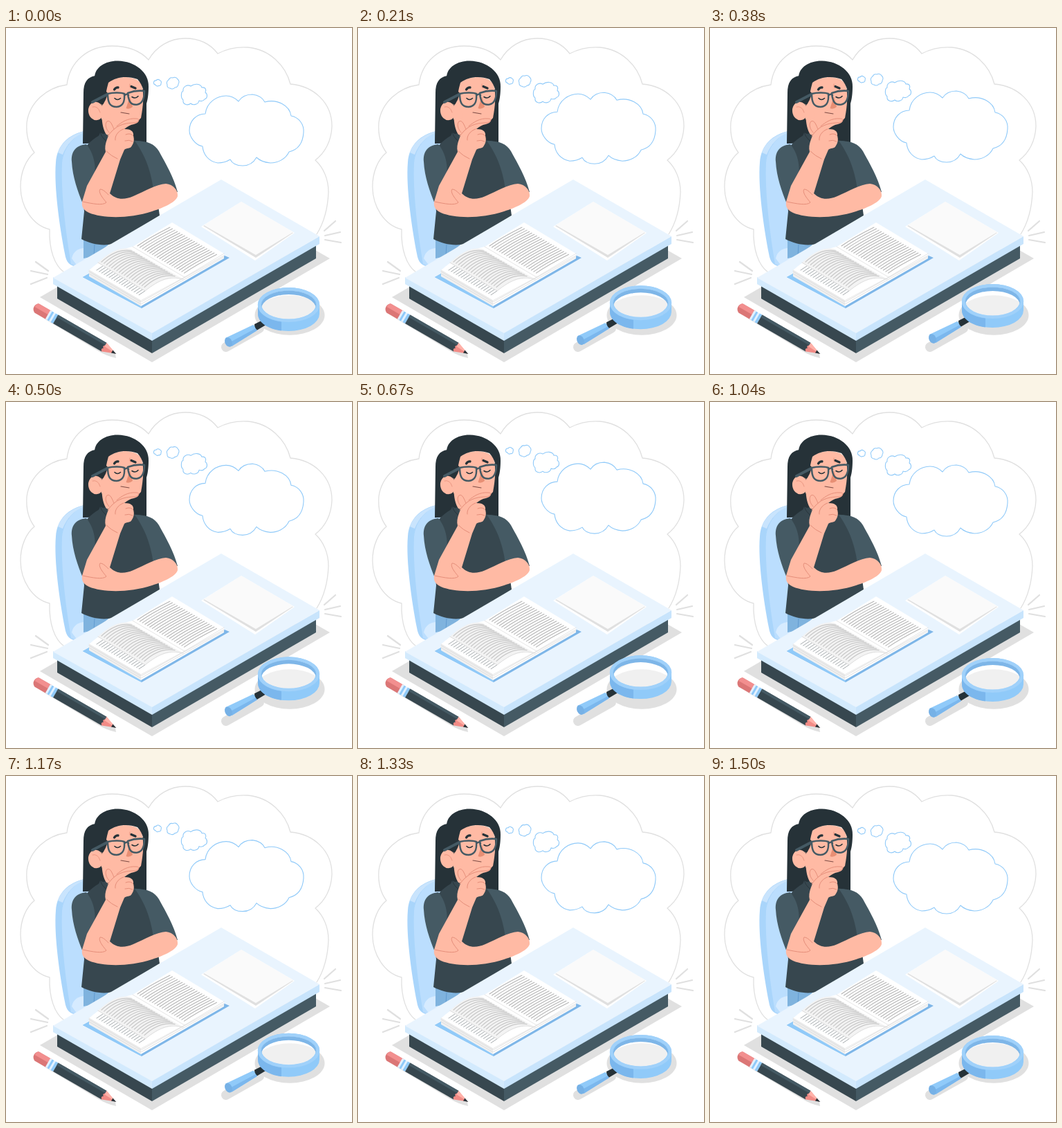
These frames come from a looping animation (500 by 500 pixels, 1.54 s). An HTML page with a canvas:

```html
<!DOCTYPE html>
<html lang="en">
<head>
<meta charset="utf-8">
<title>Thinking at a desk</title>
<style>
html, body { margin: 0; width: 100%; height: 100%; overflow: hidden; background: #fff; }
canvas { display: block; width: 500px; height: 500px; }
</style>
</head>
<body>
<canvas id="stage" width="500" height="500"></canvas>
<script>
const ctx = document.getElementById('stage').getContext('2d');
const LOOP = 1540, STEP = 1000 / 24, FLOAT = 1500, RISE = 10;
const INK = '#263238', DARK = '#37474f', SLATE = '#455a64', SKIN = '#ffbaa4',
      BLUE = '#90caf9', GREY = '#e0e0e0', CREASE = '#e58e7a';

function fill(color, d) {
  ctx.fillStyle = color;
  ctx.fill(new Path2D(d));
}

function line(color, width, d) {
  ctx.strokeStyle = color;
  ctx.lineWidth = width;
  ctx.stroke(new Path2D(d));
}

function oval(color, x, y, rx, ry, angle = 0) {
  ctx.fillStyle = color;
  ctx.beginPath();
  ctx.ellipse(x, y, rx, ry, angle, 0, Math.PI * 2);
  ctx.fill();
}

// Repeats one stroke along a page, stepping by (dx, dy).
function rows(count, dx, dy, color, width, d) {
  ctx.save();
  for (let i = 0; i < count; i++) {
    line(color, width, d);
    ctx.translate(dx, dy);
  }
  ctx.restore();
}

function drawBackdrop() {
  line(GREY, 1.3, 'M84 353C70 343 62 320 63 291C38 285 21 258 21 229C21 208 29 190 41 180C32 168 29 152 30 137C34 107 59 86 88 82C92 48 119 26 153 26C176 26 194 33 206 46C217 27 236 15 259 15C281 15 296 24 306 37C319 30 335 27 350 28C381 31 404 54 411 81C445 84 471 108 471 142C470 163 461 180 447 191C459 202 466 219 466 237C465 262 459 282 449 298');
  line(GREY, 2.2, 'M43 338L61 351M36 351L60 356M36 370L59 361M460 293L476 279M461 300L483 295M461 306L484 310');
  fill(GREY, 'M49 389L211 483L468 333L440 317L80 371Z');
  fill(GREY, 'M50 417L132 466Q145 474 159 477L158 471L145 466Z');
}

function drawChair() {
  fill('#a9d5fb', 'M113 149C91 154 74 168 72 194C69 230 78 290 85 326C87 339 92 344 104 345L126 331L125 170Z');
  fill('#bbdefe', 'M113 150C96 158 83 174 81 195C79 240 87 300 94 341L104 345L128 331L126 170Z');
  fill('#c9e4fd', 'M113 149C93 155 80 165 75 180L82 183C88 168 98 157 113 151Z');
  fill('#d6ebff', 'M95 333C97 322 106 317 116 318L126 332L104 345Z');
}

function drawBody() {
  fill(INK, 'M129 69C117 71 112 79 112 94L111 167L203 165L203 90Z');
  fill('#7fb3de', 'M112 306L150 312L126 330L112 333Z');
  line('#5a95cc', .8, 'M128 313L127 329');
  fill(DARK, 'M135 155C121 164 102 177 108 210L113 265L109 305C124 313 143 316 157 311L222 271L214 215L218 176C207 165 194 163 181 162L150 150Z');
  fill(SLATE, 'M116 168C100 170 94 179 95 193C96 215 104 237 111 254L124 227C132 211 130 184 116 168Z');
  fill(SLATE, 'M186 163C205 163 215 168 221 178C232 198 242 215 248 237L214 242C212 220 206 190 186 163Z');
}

function drawHead() {
  fill(SKIN, 'M138 125C139 137 140 148 146 155C156 159 166 153 169 143L174 131Z');
  fill(DARK, 'M136 151C145 156 156 156 167 151L169 165C151 170 139 167 132 162Z');
  line(INK, .8, 'M136 151Q140 163 151 166');
  fill(SKIN, 'M144 82C154 69 188 66 196 82C200 96 198 114 195 130C188 139 167 145 153 141C143 136 141 127 140 113Z');
  fill(INK, 'M128 72C128 56 145 47 162 47.5C186 48 207 64 206 85C206 94 205 105 202 112C201 95 198 83 190 74C176 69 160 70 148 79C145 89 144 98 142 106L138 116L128 106Z');
  oval(SKIN, 130, 120, 11, 13.2, -.15);
  fill(SKIN, 'M137 111L148 107L151 131L138 132Z');
  fill(INK, 'M144 91L138 113Q145 105 147 94Z');
  line(CREASE, .8, 'M125 114Q133 112 136 122');
  line(INK, 3.3, 'M156.5 89Q159 85.5 162 86M181 84.5L187 87');
  fill('#e88f74', 'M179 99L173.5 116Q178 118 183 114Z');
  line(INK, 1.6, 'M157 101.5Q161 105.5 165.5 101.5M182 99.5Q187 103 191 98.5');
  line(CREASE, .9, 'M179 81Q178 85 180 87');
  line(SLATE, 2.5, 'M147 95C155 93 166 93 171 95C172 107 169 113 160 114C150 114 147 108 147 95ZM176 94C184 91 192 90 200 91C200 102 197 109 190 110.5C180 112 177 106 176 94ZM171 98Q174 94 177 97');
  line(SLATE, 4, 'M146 96L125 107');
  line('#7d4c46', 1.1, 'M166 122L178 124');
}

function drawArms() {
  fill(SKIN, 'M110 251L117 228L144 179C141 167 149 157 149 151C145 147 142 139 146 135C151 132 154 142 156 146C164 136 176 130 188 131C194 132 193 137 185 139C179 140 175 143 171 146C180 146 185 149 184 156C186 162 184 167 182 170C180 175 174 173 171 176L165 190L150 239C159 248 170 249 184 243C200 236 217 226 231 225C242 226 249 235 248 243C246 251 230 259 211 265C177 276 139 275 120 267C112 263 109 259 110 251Z');
  line(CREASE, 1, 'M149 151C145 147 142 139 146 135C151 132 154 142 156 146M147 156L153 149C163 139 174 137 187 137C194 134 193 131 188 131C176 130 167 136 160 142M170 146C161 149 157 157 158 162M173 154Q180 151 184 156M172 163Q178 161 183 164M145 178Q152 185 161 189');
  line(CREASE, 1, 'M148 241C144 237 140 233 136 233C133 237 139 245 145 252C140 257 125 254 111 251');
}

function drawDesk() {
  fill(DARK, 'M74 372V391L211 470V450Z');
  fill(SLATE, 'M211 450V470L448 333V312Z');
  fill('#d3eafd', 'M68 360V370L211 452V440Z');
  fill('#c8e4fc', 'M211 440V452L453 312V301Z');
  fill('#e9f4fe', 'M68 361L311 219L453 301L211 441Z');
}

function drawPapers() {
  fill('#fff', 'M282 287L340 251L417 296L360 336Z');
  fill(GREY, 'M285 286L340 254L415 296L361 332Z');
  fill('#fafafa', 'M286 285L340 251L415 295L361 328Z');
}

function drawBook() {
  fill('#7eb6e8', 'M111 360L120 355L195 399L316 329L323 332L196 405Z');
  fill(BLUE, 'M111 360L120 355L195 400L196 405Z');
  fill('#f0f0f0', 'M120 349V359L195 402V393Z');
  fill('#fff', 'M195 393V402L315 333V326Z');
  line('#d5d5d5', .7, 'M120 352L195 396L315 329M120 355L195 399L315 331');
  fill('#fff', 'M120 350Q151 323 183 316L240 281L315 326L258 360L195 394Z');
  line(GREY, .8, 'M183 316L258 360L315 326M120 350L195 394L258 360');
  rows(20, 3.55, 2.06, '#b5b5b5', 1.1, 'M190 315Q207 303 237 288');
  rows(18, 3.6, 2.1, '#7d868a', .7, 'M131 350L140 344');
  fill('#f3f3f3', 'M133 339C148 325 163 316 179 319L256 363C237 358 222 363 201 380Z');
  line('#d6d6d6', .8, 'M133 339L201 380C222 363 237 358 256 363');
  rows(18, 3.65, 2.15, '#c8c8c8', 1.2, 'M138 338C152 325 166 319 182 322');
}

function drawPencil() {
  ctx.save();
  ctx.translate(45, 405);
  ctx.rotate(.524);
  fill('#db7676', 'M-1 -7H20V7.5H0Q-5 5 -5 0T-1 -7Z');
  fill('#f28f8f', 'M-1 -7H20V0H-4Q-4 -6 -1 -7Z');
  fill('#e3f1ff', 'M18 -7H31V7.5H18Z');
  fill(BLUE, 'M21 -7H24V7.5H21ZM27 -7H31V7.5H27Z');
  fill(DARK, 'M31 -7H112V7.5H31Z');
  fill(SLATE, 'M31 -7H112V-3H31Z');
  fill('#f28b86', 'M112 -7L131 0L112 7.5Q108 4 112 2Q108 0 112 -3Z');
  fill('#ffb1a8', 'M112 -7L131 0L112 -1Z');
  fill(INK, 'M125 -2.4L132 0L125 2.4Z');
  ctx.restore();
}

function drawLensShadow() {
  oval(GREY, 410, 415, 50.5, 28.7);
  line(GREY, 14, 'M318 461L366 434');
}

function drawLens() {
  fill(BLUE, 'M317 448L357 429Q362 431 363 437L326 460Z');
  fill('#7bb7ed', 'M322 455L362 433.5L363 437L326 460Z');
  oval('#76b1e6', 321.5, 454, 5, 7.2, -.45);
  fill(INK, 'M359 428L374 420.5Q379 422 379 427L363 436.5Q359 433 359 428Z');
  // Band around the glass, open in the middle.
  ctx.fillStyle = BLUE;
  ctx.beginPath();
  ctx.ellipse(408.5, 400, 44.5, 25, 0, Math.PI, 0);
  ctx.lineTo(453, 413);
  ctx.ellipse(408.5, 413, 44.5, 25, 0, 0, Math.PI);
  ctx.closePath();
  ctx.ellipse(408.5, 400, 39, 20.5, 0, 0, Math.PI * 2);
  ctx.fill('evenodd');
  fill('#7bb7ed', 'M364 400V413C364 426 379 435 398 437.5V424.5C379 422 364 413 364 400Z');
  line('#a0d1fa', 4.5, 'M366 400A42.5 22.7 0 1 1 451 400A42.5 22.7 0 1 1 366 400Z');
  ctx.save();
  ctx.beginPath();
  ctx.ellipse(408.5, 400, 39.5, 20.5, 0, 0, Math.PI * 2);
  ctx.clip();
  oval('rgba(255,255,255,.52)', 408.5, 405, 39.5, 20.5);
  ctx.fillStyle = '#7eb6e8';
  ctx.beginPath();
  ctx.rect(364, 374, 90, 50);
  ctx.ellipse(408.5, 405.5, 39.5, 20.5, 0, 0, Math.PI * 2);
  ctx.fill('evenodd');
  ctx.restore();
}

function drawThoughts() {
  line(BLUE, 1.1, 'M288 124C290 107 305 98 318 98C326 98 332 102 336 106C341 98 350 96 356 96C364 97 371 101 374 107C392 102 410 112 412 127C423 129 431 139 430 151C429 166 422 176 409 179C404 190 392 195 382 195C372 194 366 191 362 187C357 196 349 199 342 199C334 199 327 196 324 190C316 195 309 195 306 195C293 193 285 183 284 171C273 169 265 157 265 148C265 134 275 124 288 124Z');
  line(BLUE, 1.1, 'M256 91C255 85 262 81 267 84C272 80 281 80 283 86C288 85 290 89 288 93C292 96 291 102 287 103C285 106 282 106 279 105C278 111 270 112 267 109C262 113 255 110 256 104C252 101 253 92 256 91Z');
  line(BLUE, 1.1, 'M235 75A5 5 0 0 1 241 72A5 5 0 0 1 248 74A5 5 0 0 1 249 81A5 5 0 0 1 244 86A5 5 0 0 1 237 87A4 4 0 0 1 233 82A5 5 0 0 1 235 75Z');
  line(BLUE, 1.1, 'M217 76A3 3 0 0 1 222 75.5A3 3 0 0 1 224 80A3 3 0 0 1 220.5 83.5A3 3 0 0 1 216 82A3 3 0 0 1 217 76Z');
}

function lift(time) {
  const step = Math.min(36, Math.floor((time % LOOP + 4) / STEP));
  const phase = (step + 1) * STEP % FLOAT / FLOAT;
  return RISE * (1 - Math.abs(1 - 2 * phase));
}

const scene = [drawBackdrop, drawChair, drawBody, drawHead, drawArms,
               drawDesk, drawPapers, drawBook, drawPencil, drawLensShadow];
const floating = [drawLens, drawThoughts];
const start = performance.now();

function render() {
  ctx.lineCap = ctx.lineJoin = 'round';
  ctx.fillStyle = '#fff';
  ctx.fillRect(0, 0, 500, 500);
  scene.forEach(draw => draw());
  ctx.save();
  ctx.translate(0, .55 - lift(performance.now() - start));
  floating.forEach(draw => draw());
  ctx.restore();
  requestAnimationFrame(render);
}
render();
</script>
</body>
</html>
```
